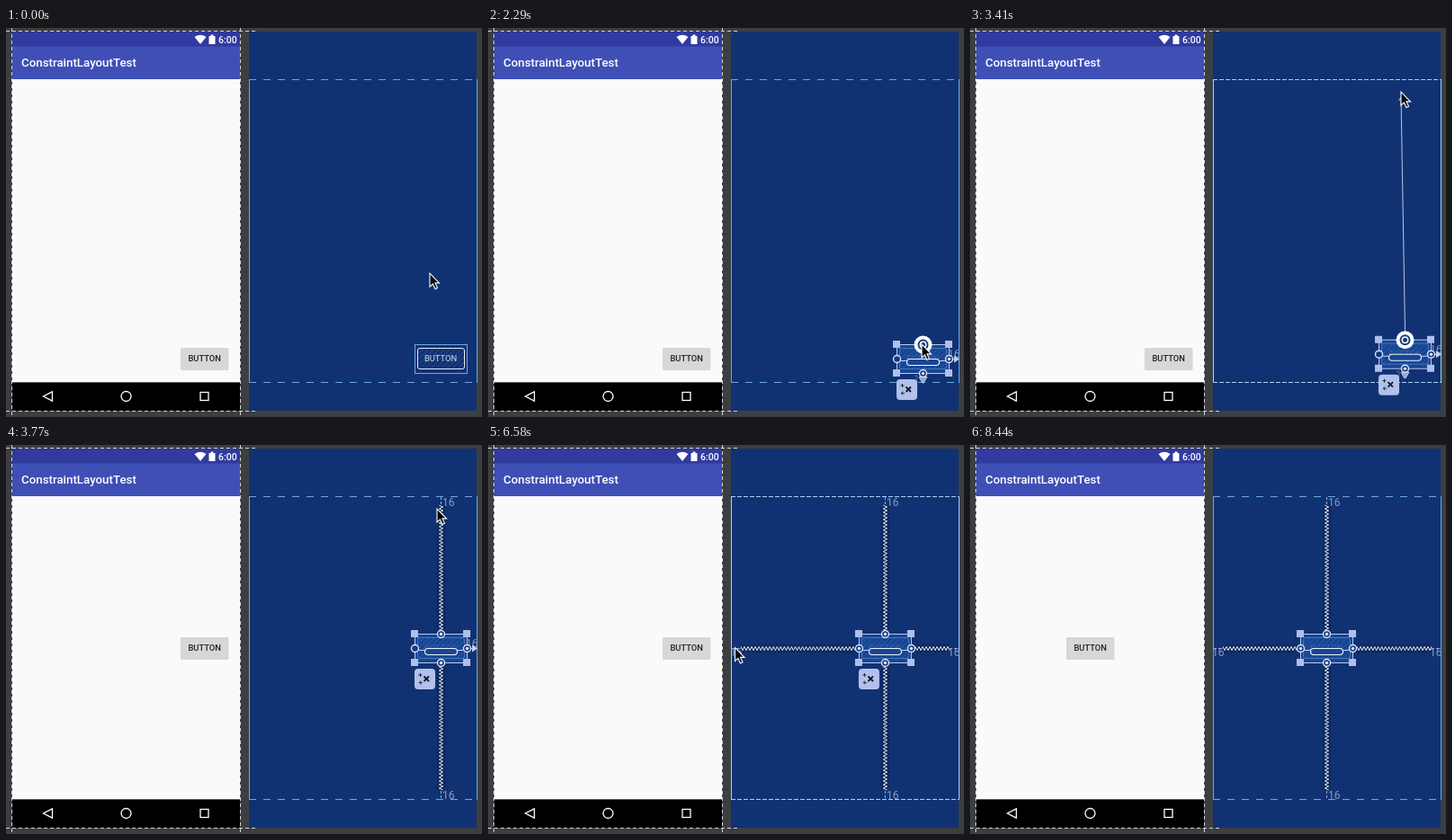
Animation, 529 px wide and 433 px high, one loop 9.03 s. Source, as an HTML page:

```html
<!DOCTYPE html>
<html lang="en">
<head>
<meta charset="utf-8">
<title>Constraint layout editor</title>
<style>
html, body { margin: 0; width: 100%; height: 100%; overflow: hidden; background: #3c3f41; }
svg { display: block; width: 529px; height: 433px; font-family: Roboto, sans-serif; }
.guide { fill: none; stroke: #d4d4d4; stroke-dasharray: 4 3; }
.edge { fill: none; stroke: #69a9dc; }
.dash { stroke-dasharray: 8 8; }
.hot .edge { stroke: #a3d2f8; }
.hot .dash { stroke-dasharray: 5 2; }
.num { font-size: 12px; fill: #8b9bc3; }
.icon { fill: none; stroke: #fff; stroke-width: 1.3; }
.tick { fill: none; stroke: #9eadd2; stroke-dasharray: 3 2; }
.spring { fill: none; stroke: #e3e9f8; stroke-width: 1; }
.shade { fill: none; stroke: #0a2350; stroke-width: 3; }
.anchor { fill: #123a80; stroke: #dbe4fa; stroke-width: 1.4; }
.dot { fill: #dbe4fa; }
</style>
</head>
<body>
<svg viewBox="0 0 529 433">
  <defs>
    <pattern id="hatch" width="6" height="6" patternUnits="userSpaceOnUse">
      <path d="M-1 1L1 -1M0 6L6 0M5 7L7 5" stroke="#3d74bd" stroke-width=".8"/>
    </pattern>
    <clipPath id="sheet"><rect x="270" y="4" width="254" height="422"/></clipPath>
  </defs>

  <rect width="529" height="433" fill="#3c3f41"/>

  <!-- device preview -->
  <rect x="7" y="4" width="253" height="422" fill="#fafafa"/>
  <rect x="7" y="4" width="253" height="17" fill="#303a9f"/>
  <rect x="7" y="20.500" width="253" height="36.500" fill="#3f4fb6"/>
  <rect x="7" y="394.400" width="253" height="31.600" fill="#000"/>
  <path d="M209.500 10Q216 5.500 222.500 10L216 18Z" fill="#fff"/>
  <path d="M225.500 9H227.500V7.500H230.500V9H232.500V18H225.500Z" fill="#fff"/>
  <text x="236" y="16.800" font-size="10.500" font-weight="500" fill="#fff">6:00</text>
  <text x="17" y="42.800" font-size="13.300" font-weight="500" fill="#fff">ConstraintLayoutTest</text>
  <path class="icon" d="M51.500 404.800V415.200L41.500 410Z"/>
  <circle class="icon" cx="133.500" cy="410" r="5.500"/>
  <rect class="icon" x="216" y="405.500" width="9" height="9"/>
  <g id="real">
    <rect x="194" y="356" width="53.500" height="25" rx="1.500" fill="#d6d7d7"/>
    <text x="220.700" y="371.300" font-size="9.400" font-weight="500" fill="#222" text-anchor="middle">BUTTON</text>
  </g>
  <path class="guide" d="M6.500 0V433M260.500 0V433M0 3.500H280M0 426.500H280"/>

  <!-- blueprint -->
  <rect x="270" y="4" width="253" height="422" fill="#113272"/>
  <g id="frame">
    <path class="edge" d="M270.500 57V395M523.500 57V395"/>
    <path class="edge dash" d="M270 57.500H524M270 394.500H524"/>
  </g>
  <g clip-path="url(#sheet)">
    <g id="vert">
      <path class="shade"/><path class="spring"/><path class="tick"/>
      <text class="num" y="68">16</text><text class="num" y="394">16</text>
    </g>
    <g id="horz">
      <path class="shade"/><path class="spring"/><path class="tick"/>
      <text class="num" x="269" y="235">16</text><text class="num" x="511" y="235">16</text>
    </g>

    <!-- widget, drawn around its centre -->
    <g id="widget">
      <rect id="fill" x="-29" y="-16" width="58" height="32" fill="#174694"/>
      <rect id="weave" x="-26" y="-12" width="53" height="24" rx="2.500" fill="url(#hatch)" opacity=".55"/>
      <rect id="outer" x="-28.500" y="-15.500" width="58" height="32" fill="none" stroke="#6fa9df"/>
      <rect id="inner" x="-25.500" y="-11.500" width="52" height="23" rx="2.500" fill="none" stroke="#e6ecf8"/>
      <text id="label" y="3.300" font-size="9.400" fill="#d3dbec" text-anchor="middle">BUTTON</text>
      <g id="right">
        <text class="num" x="28" y="-1">16</text>
        <path d="M29 .5H36" stroke="#c5d0ee"/><path d="M35 -3.500L41 .5L35 4.500Z" fill="#c5d0ee"/>
      </g>
      <g id="below">
        <text class="num" x="-10" y="27" font-size="9" opacity=".5">16</text>
        <path d="M.5 16V21" stroke="#c5d0ee"/><path d="M-4 20.500H5L.5 27.500Z" fill="#8fa3d6" stroke="#c5d0ee"/>
      </g>
      <g id="handles">
        <path id="corners" d="M-33 -20h8v8h-8zM25 -20h8v8h-8zM-33 12h8v8h-8zM25 12h8v8h-8z"/>
        <g id="pill" fill="#174694" stroke="#f0f4ff" stroke-width="1.100">
          <path d="M-25 2.500H-18M19 2.500H26" opacity=".8"/>
          <rect x="-17.500" y=".5" width="36" height="7" rx="3.500"/>
        </g>
        <g class="anchor">
          <circle cx=".5" cy="-15.500" r="4"/><circle cx=".5" cy="16.500" r="4"/>
          <circle cx="-28.500" cy=".5" r="4"/><circle cx="29.500" cy=".5" r="4"/>
        </g>
        <g class="dot">
          <circle id="topDot" cx=".5" cy="-15.500" r="1.700"/><circle cx=".5" cy="16.500" r="1.700"/>
          <circle id="leftDot" cx="-28.500" cy=".5" r="1.700"/><circle cx="29.500" cy=".5" r="1.700"/>
        </g>
        <g id="glow">
          <circle r="10" fill="#fff"/>
          <circle r="5" fill="#fff" stroke="#123a80" stroke-width="2"/>
          <circle r="2.500" fill="#123a80"/>
        </g>
      </g>
      <g id="chip" transform="translate(-29 23)">
        <rect width="23" height="23" rx="4" fill="#b2c1eb"/>
        <path d="M10.500 8.500L16 14M16 8.500L10.500 14" stroke="#111827" stroke-width="1.800"/>
        <path d="M4.500 7H8.500M6.500 5V9M5.500 15.500H9M7 13.500L5.500 15.500L7 17.500" fill="none" stroke="#111827" stroke-width=".9"/>
      </g>
    </g>
  </g>

  <path id="wire" fill="none" stroke="#b8c5ec"/>
  <path id="cursor" d="M0 0V15L3.400 11.900L6 17.500L8.500 16.300L6 10.900H10.500Z" fill="#000" stroke="#fff" stroke-width="1.100"/>
</svg>
<script>
const LOOP = 9030;
const $ = id => document.getElementById(id);
const stops = [0, 540, 1070, 1340, 2200, 2290, 2980, 3150, 3240, 3770, 4120, 4200, 4650,
  5000, 5520, 5870, 5960, 6840, 6920, 7010, 7640, 7910, 7990, 8440, LOOP];

// time, x, y of the pointer tip
const path = [
  [0, 471, 273], [450, 471, 273], [1070, 478, 373], [1500, 478, 373], [2020, 482, 352],
  [2290, 482, 352], [2980, 471, 108], [3240, 479, 71], [3770, 479, 71], [4120, 490, 243],
  [4200, 488, 242], [4650, 452, 226], [5000, 452, 226], [5520, 451, 227],
  [6360, 274.5, 225.5], [7010, 274.5, 225.5], [7640, 512, 7]
];

const ease = u => u * u * (3 - 2 * u);
const ramp = (t, a, b) => ease(Math.min(1, Math.max(0, (t - a) / (b - a))));
const mix = (a, b, u) => a + (b - a) * u;
const within = (t, a, b) => t >= a && t < b;
const show = (id, on) => $(id).style.display = on ? '' : 'none';

function snap(t) {
  let i = 0;
  while (stops[i + 1] <= t) i++;
  const a = stops[i], span = stops[i + 1] - a;
  const step = span / Math.round(span / 87);
  return a + Math.floor((t - a) / step + 1e-4) * step;
}

function pointer(t) {
  if (t >= 7640) return within(t, 7910, 7990) ? [527, 422] : [-50, -50];
  let i = 0;
  while (i < path.length - 2 && path[i + 1][0] <= t) i++;
  const [a, x, y] = path[i], [b, X, Y] = path[i + 1];
  const u = ramp(t, a, b);
  return [mix(x, X, u), mix(y, Y, u)];
}

function zigzag(from, to, mid, upright) {
  const n = Math.max(2, Math.round((to - from) / 2));
  let d = '';
  for (let i = 0; i <= n; i++) {
    const along = mix(from, to, i / n).toFixed(1);
    const off = (mid + (i % 2 ? 2.2 : -2.2)).toFixed(1);
    d += (i ? 'L' : 'M') + (upright ? off + ' ' + along : along + ' ' + off);
  }
  return d;
}

function springs(id, d, ticks) {
  const [shade, line, tick] = $(id).querySelectorAll('path');
  shade.setAttribute('d', d);
  line.setAttribute('d', d);
  tick.setAttribute('d', ticks);
}

function draw(now) {
  const t = snap(now % LOOP);
  const [px, py] = pointer(t);
  const x = mix(483, 396, ramp(t, 6400, 6760));
  const y = mix(368, 226, ramp(t, 3290, 3620));
  const tall = t >= 3330, wide = t >= 6450;
  const over = t >= 980, chosen = t >= 1340;
  const k = ramp(t, 1420, 1950);

  $('cursor').setAttribute('transform', `translate(${px} ${py})`);
  $('widget').setAttribute('transform', `translate(${x} ${y})`);
  $('real').setAttribute('transform', `translate(${t >= 6920 ? -87 : 0} ${t >= 3680 ? -142 : 0})`);

  show('fill', over);
  show('right', over && !wide);
  show('below', over && !tall);
  show('handles', chosen);
  show('chip', chosen && t < 8440);
  show('topDot', tall);
  show('leftDot', wide);
  $('pill').style.opacity = k;
  $('label').style.opacity = mix(1, .15, k);
  $('inner').style.opacity = chosen ? mix(.6, .25, k) : 1;
  $('outer').style.stroke = chosen ? '#b9caf0' : '#6fa9df';
  $('corners').style.fill = `rgb(${mix(132, 176, k)},${mix(182, 191, k)},${mix(242, 233, k)})`;

  const up = within(t, 1900, 3330), side = within(t, 5600, 6450);
  show('glow', up || side);
  $('glow').setAttribute('transform', up ? 'translate(.5 -15.5)' : 'translate(-28.5 .5)');
  const pull = within(t, 2370, 3330) || side;
  show('wire', pull);
  if (pull) {
    const start = up ? `${x + .5} ${y - 25}` : `${x - 38} ${y + .5}`;
    const head = up ? 'm-2.5 4l2.5 -4l2.5 4' : 'm4 -2.5l-4 2.5l4 2.5';
    $('wire').setAttribute('d', `M${start}L${px} ${py + (up ? 6 : 0)}${head}`);
  }
  $('frame').classList.toggle('hot', within(t, 2370, 3600) || within(t, 5600, 6900));

  show('vert', tall);
  show('horz', wide);
  if (tall) {
    springs('vert', zigzag(67, y - 20, x + .5, true) + zigzag(y + 21, 384, x + .5, true),
      `M${x + .5} 58V67M${x + .5} 385V394`);
    $('vert').querySelectorAll('text').forEach(e => e.setAttribute('x', x + 2));
  }
  if (wide) {
    springs('horz', zigzag(281, x - 33, y + .5, false) + zigzag(x + 34, 513, y + .5, false),
      `M271 ${y + .5}H281M513 ${y + .5}H523`);
  }
}

function loop() {
  draw(performance.now());
  requestAnimationFrame(loop);
}
loop();
</script>
</body>
</html>
```
